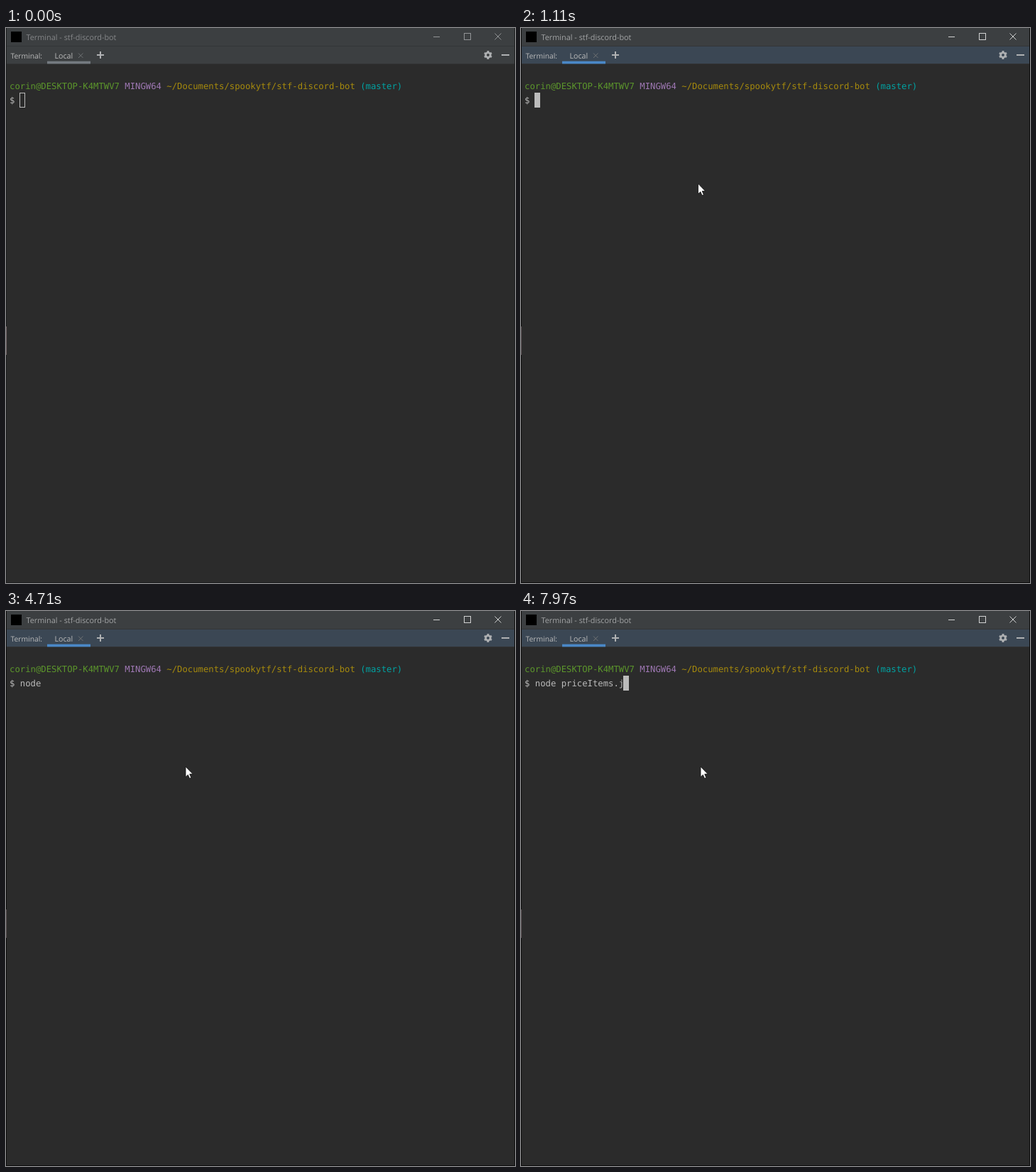
Animation, 717 px wide and 781 px high, one loop 8000 ms. Source, as an HTML page:

```html
<!DOCTYPE html>
<html lang="en">
<head>
<meta charset="utf-8">
<title>Terminal</title>
<style>
  html, body { margin: 0; width: 100%; height: 100%; overflow: hidden; background: #2b2b2b; }
  svg { display: block; width: 717px; height: 781px; }
  text { text-rendering: geometricPrecision; white-space: pre; }
  .ui { font-family: "Open Sans", "Noto Sans", sans-serif; font-size: 10.7px; fill: #bbb; }
  .term { font-family: "DejaVu Sans Mono", "Noto Sans Mono", monospace; font-size: 12.26px; fill: #bbb; }
  .crisp { shape-rendering: crispEdges; }
  .icon { fill: none; stroke: #afb1b3; }
  #title { fill: #858789; font-size: 10.85px; }
  #controls { fill: none; stroke: #929496; }
  #header { fill: #3c3f41; }
  #underline { fill: #747a80; }
  #border { stroke: #1c1d1e; }
  #edge { fill: #75676a; }
  .active #title { fill: #a3a5a6; }
  .active #controls { stroke: #d2d3d3; }
  .active #border { stroke: #0c0c0c; }
  .active #edge { fill: #5a5052; }
  .focused #header { fill: #3b4754; }
  .focused #underline { fill: #4a88c7; }
</style>
</head>
<body>
<svg id="stage" viewBox="0 0 717 781">
  <rect width="717" height="781" fill="#2b2b2b"/>
  <g class="crisp">
    <rect width="717" height="25" fill="#3c3f41"/>
    <rect y="25" width="717" height="1" fill="#333637"/>
    <rect id="header" y="26" width="717" height="24"/>
    <rect y="50" width="717" height="1" fill="#323334"/>
    <rect x="7" y="5" width="15" height="15" fill="#000"/>
    <path id="border" d="M.5 0V781M716.5 0V781M0 780.5H717"/>
    <rect id="edge" y="420" width="1" height="40"/>
  </g>
  <rect id="underline" x="58" y="46.7" width="61" height="3.7"/>

  <text id="title" class="ui" x="28.5" y="17">Terminal - stf-discord-bot</text>
  <g id="controls">
    <path class="crisp" d="M602 12.5H611M645.5 7.5H654.5V16.5H645.5Z"/>
    <path d="M688.5 7.5L697.5 16.5M697.5 7.5L688.5 16.5"/>
  </g>

  <text class="ui" x="6.5" y="42.5" style="font-size:10.3px">Terminal:</text>
  <text class="ui" x="68.5" y="42.5">Local</text>
  <path class="icon" d="M102 35.5L108.5 42M108.5 35.5L102 42" style="stroke:#6e7173"/>
  <path class="icon" d="M128 38H138M133 33V43" stroke-width="2"/>
  <path class="icon" d="M698 38H709" stroke-width="2"/>
  <g class="icon" transform="translate(679 38) rotate(30)">
    <circle r="3.3" stroke-width="2.8"/>
    <circle r="4.9" stroke-width="2" pathLength="12" stroke-dasharray="1 1" stroke-dashoffset=".5"/>
  </g>

  <text class="term" x="5" y="86"><tspan fill="#5c962c">corin@DESKTOP-K4MTWV7</tspan> <tspan fill="#9f78b4">MINGW64</tspan> <tspan fill="#a68a0d">~/Documents/spookytf/stf-discord-bot</tspan> <tspan fill="#00a3a3">(master)</tspan></text>
  <text id="command" class="term" x="5" y="106"></text>
  <rect id="caret" class="crisp"/>
  <path id="pointer" d="M0 0V14.6L3.3 11.5L5.6 16.6L7.9 15.6L5.7 10.6H10.2Z" fill="#fff" stroke="#111" stroke-width=".8"/>
</svg>
<script>
const LOOP = 8000;
const CELL = 7.37;
const COMMAND = "node priceItems.j";
const keyTimes = [2380, 2660, 2770, 2990, 3100, 4770, 5720, 6000, 6110, 6280,
                  7000, 7120, 7290, 7400, 7570, 7740, 7970];
const caretOff = [[1600, 2210], [3600, 4160], [4710, 4770], [6780, 7000]];
const ACTIVE = 990, CARET_FILL = 1050, FOCUS = 1110;
const glide = { start: 160, end: 940, steps: 14, from: [685, 760], to: [251, 222] };

const el = id => document.getElementById(id);
const [stage, command, caret, pointer] = ["stage", "command", "caret", "pointer"].map(el);

function pointerAt(t) {
  if (t >= 1320) return [253, 219];
  if (t >= ACTIVE) return [249.5, 219];
  const { start, end, steps, from, to } = glide;
  const u = Math.min(1, Math.floor((t - start) / (end - start) * steps + 1e-6) / steps);
  const eased = 1 - (1 - u) ** 2;
  return from.map((v, i) => v + (to[i] - v) * eased);
}

function drawCaret(t, typed) {
  const left = Math.floor(4.85 + CELL * (2 + typed));
  const filled = t >= CARET_FILL;
  const inset = filled ? 0 : 0.5;
  const attrs = {
    x: left + inset, y: 91 + inset,
    width: 8 - 2 * inset, height: 21 - 2 * inset,
    fill: filled ? "#bbb" : "none",
    stroke: filled ? "none" : "#bbb",
    visibility: caretOff.some(([a, b]) => t >= a && t < b) ? "hidden" : "visible"
  };
  for (const name in attrs) caret.setAttribute(name, attrs[name]);
}

function render(t) {
  const typed = keyTimes.filter(k => t >= k).length;
  stage.classList.toggle("active", t >= ACTIVE);
  stage.classList.toggle("focused", t >= FOCUS);
  command.textContent = "$ " + COMMAND.slice(0, typed);
  drawCaret(t, typed);
  pointer.setAttribute("visibility", t >= glide.start ? "visible" : "hidden");
  pointer.setAttribute("transform", `translate(${pointerAt(t)})`);
}

const began = performance.now();
function tick() {
  render((performance.now() - began) % LOOP);
  requestAnimationFrame(tick);
}
tick();
</script>
</body>
</html>
```
